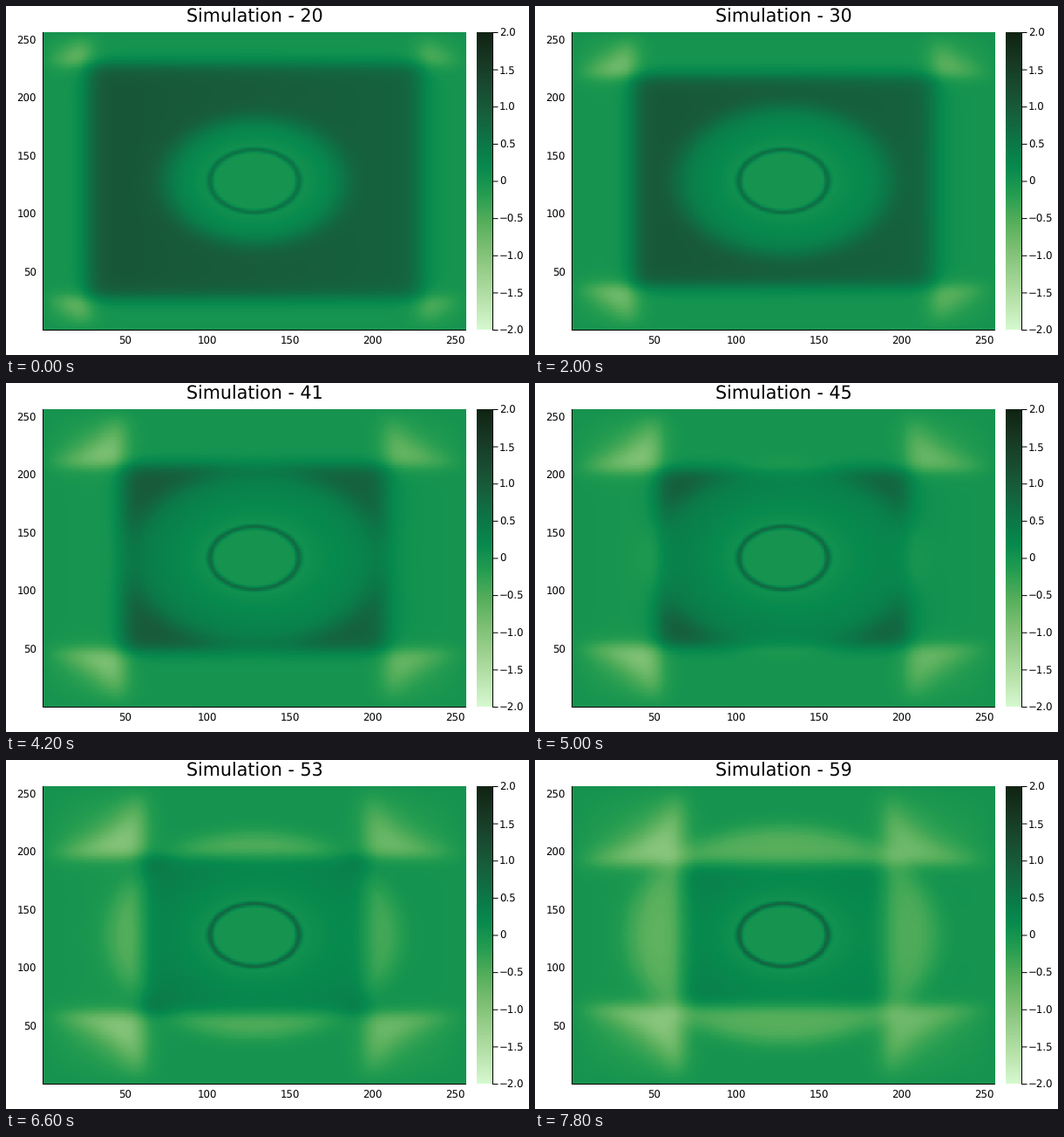
Recreate the animation shown at these times as a matplotlib script. Size 600 px wide and 400 px high, loop 8000 ms.

```python
import numpy as np
import matplotlib.pyplot as plt
from matplotlib.animation import FuncAnimation
from matplotlib.colors import LinearSegmentedColormap

W, H, DPI = 600, 400, 100
N = 256                      # grid cells per side
FIRST, FRAMES, STEP_MS = 20, 40, 200
LEAD = 8                     # wave time already elapsed at label 0
SUB = 2                      # solver steps per frame
RADIUS, SOFT = 27, 7.5       # obstacle radius, softness of the wave front

ALGAE = [(214, 249, 207), (186, 228, 174), (156, 209, 143), (124, 191, 115),
         (85, 174, 91), (37, 157, 81), (7, 138, 78), (13, 117, 71),
         (23, 95, 61), (25, 75, 49), (23, 55, 35), (17, 36, 20)]
cmap = LinearSegmentedColormap.from_list("algae", np.array(ALGAE) / 255, N=256)

axis = np.arange(1, N + 1)
x, y = np.meshgrid(axis, axis)
r = np.hypot(x - 128.5, y - 128.5)
ring = np.exp(-((r - 27) / 1.9) ** 2)
free = (r > RADIUS).astype(float)


def laplacian(u):
    p = np.pad(u, 1)
    return p[2:, 1:-1] + p[:-2, 1:-1] + p[1:-1, 2:] + p[1:-1, :-2] - 4 * u


def start_field():
    edge = lambda d: np.tanh(d / SOFT)
    walls = edge(x) * edge(N + 1 - x) * edge(y) * edge(N + 1 - y)
    level = 1.1 - 0.28 * x / N
    return level * walls * edge(np.maximum(r - RADIUS, 0))


def simulate():
    """Wave equation with zero walls and a fixed disc in the middle."""
    k = 1 / SUB ** 2
    u = start_field()
    prev = u + 0.5 * k * laplacian(u) * free
    fields = []
    for n in range(1, FIRST + FRAMES + LEAD):
        for _ in range(SUB):
            u, prev = (2 * u - prev + k * laplacian(u)) * free, u
        if n >= FIRST + LEAD:
            fields.append(u)
    return fields


fields = simulate()

plt.rcParams["font.family"] = "DejaVu Sans"
plt.rcParams["text.hinting"] = "none"
fig = plt.figure(figsize=(W / DPI, H / DPI), dpi=DPI, facecolor="white")


def pixel_axes(left, top, right, bottom):
    ax = fig.add_axes([left / W, 1 - bottom / H,
                       (right - left) / W, (bottom - top) / H])
    ax.axis("off")
    return ax


def label(px, py, text, size=11.7, **kw):
    """Text whose digits or capitals are centred on the height py."""
    base = py + 0.3645 * size
    return fig.text(px / W, 1 - base / H, text, fontsize=size * 72 / DPI,
                    va="baseline", **kw)


def line(x0, y0, x1, y1):
    fig.add_artist(plt.Line2D([x0 / W, x1 / W], [1 - y0 / H, 1 - y1 / H],
                              color="black", lw=0.72, snap=False))


LEFT, TOP, RIGHT, BOTTOM = 42.5, 30.5, 527.5, 371.5
plot = pixel_axes(42, 30, 527.4, 371)
image = plot.imshow(fields[0], cmap=cmap, vmin=-2, vmax=2, origin="lower",
                    aspect="auto", interpolation="nearest")
bar = pixel_axes(540, 30, 558, 371)
bar.imshow(np.linspace(-2, 2, 256)[:, None], cmap=cmap, vmin=-2, vmax=2,
           origin="lower", aspect="auto", interpolation="nearest")

line(LEFT, BOTTOM, RIGHT, BOTTOM)
line(LEFT, TOP, LEFT, BOTTOM)
line(558.5, TOP, 558.5, BOTTOM)
for v in range(50, 251, 50):
    f = (v - 0.5) / N
    label(LEFT + f * (RIGHT - LEFT), 383.5, str(v), ha="center")
    label(35, BOTTOM - f * (BOTTOM - TOP), str(v), ha="right")
for v in np.arange(-2, 2.1, 0.5):
    py = BOTTOM - (v + 2) / 4 * (BOTTOM - TOP)
    line(558.5, py, 564, py)
    text = f"{v:.1f}".replace("-", "\u2212") if v else "0"
    label(566, py, text, ha="left")
title = label(285.5, 11, "", size=20.6, ha="center")


def draw(i):
    strength = 0.6 + 0.2 * i / (FRAMES - 1)
    image.set_data(fields[i] + strength * ring)
    title.set_text(f"Simulation - {FIRST + i}")
    return image, title


anim = FuncAnimation(fig, draw, frames=FRAMES, interval=STEP_MS,
                     repeat=True, repeat_delay=0)
plt.show()
```
